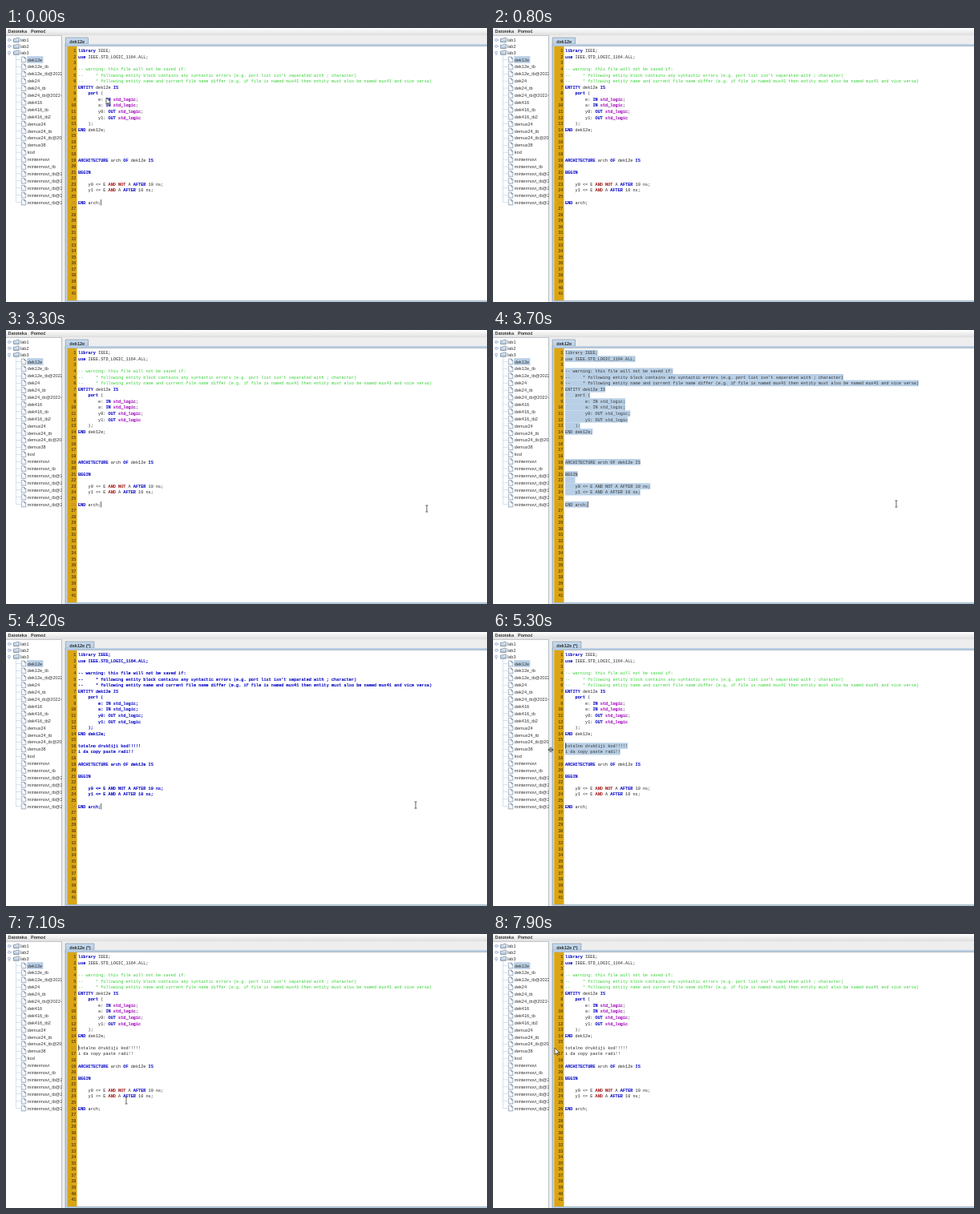
Write an HTML page with a canvas that moves like this. It is 600 px wide and 342 px high and loops after 8 s.

```html
<!DOCTYPE html>
<html lang="hr">
<head>
<meta charset="utf-8">
<title>VHDL editor</title>
<style>
html, body { margin: 0; width: 100%; height: 100%; overflow: hidden; background: #fff; }
canvas { display: block; width: 600px; height: 342px; }
</style>
</head>
<body>
<canvas id="stage" width="600" height="342"></canvas>
<script>
const ctx = document.getElementById('stage').getContext('2d');
const LOOP = 8000, CHAR = 3.128, ROW = 7.57, LEFT = 90, TOP = 28.5;
const MONO = '"Liberation Mono", monospace';
const SANS = '"Liberation Sans", sans-serif';
const SELECT = '#b8cfe5', EDGE = '#7a8a99', BLUE = '#0000c4', HEAVY = 0.22;

const code = `library IEEE;
use IEEE.STD_LOGIC_1164.ALL;

-- warning: this file will not be saved if:
--     * following entity block contains any syntactic errors (e.g. port list isn't separated with ; character)
--     * following entity name and current file name differ (e.g. if file is named mux41 then entity must also be named mux41 and vice versa)
ENTITY dek12e IS
    port (
        e: IN std_logic;
        a: IN std_logic;
        y0: OUT std_logic;
        y1: OUT std_logic
    );
END dek12e;




ARCHITECTURE arch OF dek12e IS

BEGIN
    
    y0 <= E AND NOT A AFTER 10 ns;
    y1 <= E AND A AFTER 10 ns;

END arch;`.split('\n');
const edited = code.slice();
edited[15] = 'totalno drukčiji kod!!!!!';
edited[16] = 'i da copy paste radi!!';

const files = ['dek12e', 'dek12e_tb', 'dek12e_tb@2022-04', 'dek24', 'dek24_tb', 'dek24_tb@2022-04',
  'dek416', 'dek416_tb', 'dek416_tb2', 'demux24', 'demux24_tb', 'demux24_tb@2022', 'demux38', 'kod',
  'mintermovi', 'mintermovi_tb', ...Array(5).fill('mintermovi_tb@2022')];

// Pointer keys: time, x, y
const enterPath = [[3000, 558, 232], [3500, 503, 217], [3700, 503, 217], [4200, 511, 216], [4600, 511, 216],
  [4800, 340, 230], [5000, 160, 149], [5200, 72, 147], [5400, 72, 147], [5600, 66, 158], [5850, 150, 227],
  [6100, 159, 149], [6400, 108, 149], [6600, 84, 141], [6750, 84, 144], [7000, 150, 235], [7250, 150, 168],
  [7500, 100, 148], [7700, 26, 152], [7900, 79, 147], [8000, 79, 147]];
const leavePath = [[0, 127, 92], [100, 127, 92], [700, 112, 350]];

function along(path, t) {
  if (t < path[0][0]) return null;
  for (let i = 1; i < path.length; i++) {
    const [t0, x0, y0] = path[i - 1], [t1, x1, y1] = path[i];
    if (t <= t1) {
      const k = (t - t0) / (t1 - t0);
      return [x0 + (x1 - x0) * k, y0 + (y1 - y0) * k];
    }
  }
  return null;
}

function box(x, y, w, h, fill) {
  ctx.fillStyle = fill;
  ctx.fillRect(x, y, w, h);
}

function poly(points, fill, stroke, open) {
  ctx.beginPath();
  points.forEach(([x, y]) => ctx.lineTo(x, y));
  if (!open) ctx.closePath();
  if (fill) { ctx.fillStyle = fill; ctx.fill(); }
  if (stroke) { ctx.strokeStyle = stroke; ctx.stroke(); }
}

// Sizes are drawn ten times larger and scaled down for even spacing
function text(s, x, y, font, color, weight = 0, align = 'left') {
  ctx.save();
  ctx.translate(x, y);
  ctx.scale(0.1, 0.1);
  ctx.font = font;
  ctx.textAlign = align;
  ctx.fillStyle = ctx.strokeStyle = color;
  ctx.fillText(s, 0, 0);
  if (weight) {
    ctx.lineWidth = weight * 10;
    ctx.lineJoin = 'round';
    ctx.strokeText(s, 0, 0);
  }
  ctx.restore();
}

const mono = (s, x, y, color, weight, align) => text(s, x, y, `${CHAR / 0.06}px ${MONO}`, color, weight, align);
const label = (s, x, y, bold) => text(s, x, y, `${bold ? 'bold ' : ''}55.7px ${SANS}`, '#333');
const rowY = row => TOP + (row - 1) * ROW;
const fileY = i => 39.5 + i * 8.9;

function shade(y0, y1, from, to) {
  const g = ctx.createLinearGradient(0, y0, 0, y1);
  g.addColorStop(0, from);
  g.addColorStop(1, to);
  return g;
}

function folder(y, open) {
  ctx.lineWidth = 0.6;
  ctx.beginPath();
  ctx.arc(4, y, 1.5, 0, 7);
  ctx.fillStyle = '#fff';
  ctx.fill();
  ctx.strokeStyle = '#6382bf';
  ctx.stroke();
  poly(open ? [[4, y + 1.5], [4, y + 3.6]] : [[5.5, y], [7.6, y]], null, '#6382bf', true);
  poly([[9.5, y - 1.6], [12.5, y - 1.6], [13.2, y - 2.6], [16.3, y - 2.6], [16.3, y + 2.6], [9.5, y + 2.6]],
    shade(y - 2, y + 3, '#e4eef8', '#a9c1da'), '#55677c');
}

function fileIcon(y) {
  ctx.lineWidth = 0.6;
  poly([[19.3, y - 3.4], [22.8, y - 3.4], [24.8, y - 1.4], [24.8, y + 3.4], [19.3, y + 3.4]],
    shade(y - 3, y + 4, '#fff', '#e6eef8'), '#6f8299');
  poly([[22.8, y - 3.4], [22.8, y - 1.4], [24.8, y - 1.4]], '#b8cfe5', '#6f8299');
}

function tree() {
  ctx.save();
  ctx.beginPath();
  ctx.rect(0, 10, 69.5, 332);
  ctx.clip();
  box(12.4, 34, 0.6, fileY(files.length - 1) - 34, SELECT);
  ['lab1', 'lab2', 'lab3'].forEach((name, i) => {
    const y = 15 + i * 7.8;
    folder(y, i === 2);
    label(name, 18, y + 2);
  });
  box(26.2, 35.2, 20.2, 8.6, SELECT);
  files.forEach((name, i) => {
    const y = fileY(i);
    box(12.4, y - 0.3, 6, 0.6, SELECT);
    fileIcon(y);
    label(name, 26.8, y + 2);
  });
  ctx.restore();
}

function shell(dirty, current) {
  box(0, 0, 600, 342, '#fff');
  box(0, 0, 600, 9.6, shade(0, 9.6, '#fff', '#dcdcdc'));
  label('Datoteka', 2.5, 6, true);
  label('Pomoć', 31, 6, true);
  box(69.5, 9.6, 530.5, 10.6, '#eee');
  box(69.5, 9.6, 5, 332.4, '#eee');
  box(0, 9.4, 70, 0.6, '#aab4c0');
  box(69.3, 10, 0.7, 332, '#9aa7b5');
  tree();
  const w = dirty ? 35.6 : 28.2;
  ctx.lineWidth = 0.6;
  poly([[74.3, 20.2], [74.3, 12], [74.3 + w, 12], [74.3 + w, 20.2]], shade(11, 21, '#c8dcf0', SELECT), EDGE);
  label(dirty ? 'dek12e (*)' : 'dek12e', 79.3, 18.5, true);

  // Editor border, then the line number gutter
  box(73.8, 20, 526.2, 2, SELECT);
  box(73.8, 22, 526.2, 0.6, EDGE);
  box(73.8, 20, 2, 322, SELECT);
  box(73.8, 20, 0.6, 322, EDGE);
  box(76.2, 23, 12.3, 317, '#dba514');
  box(75.8, 340, 524.2, 0.7, EDGE);
  box(73.8, 340.7, 526.2, 1.3, SELECT);
  for (let n = 1; n <= 41; n++) {
    mono(n, 87.4, rowY(n) + 1.8, n === current ? '#c08a28' : '#2a2010', 0, 'right');
  }
}

const tokens = /(\b(?:library|use|ENTITY|IS|port|IN|OUT|END|ARCHITECTURE|OF|BEGIN|AFTER)\b)|(\b(?:AND|NOT)\b)|(\bstd_logic\b)/g;

function codeLine(s, y, plain) {
  const put = (part, at, color, weight) => mono(part, LEFT + at * CHAR, y, color, weight);
  if (plain) return put(s, 0, plain, HEAVY);
  if (s.startsWith('--')) return put(s, 0, '#32d032');
  let at = 0;
  for (const m of s.matchAll(tokens)) {
    put(s.slice(at, m.index), at, '#222');
    put(m[0], m.index, m[1] ? BLUE : m[2] ? '#a01818' : '#a000b8', HEAVY);
    at = m.index + m[0].length;
  }
  put(s.slice(at), at, '#222');
}

// Drag goes left from the end of row 17, then up to row 16
function dragSelection(t, start, up) {
  if (t >= up) return { 16: 0, 17: 0 };
  const [x] = along(enterPath, Math.max(start, t - 60));
  return { 17: Math.max(0, Math.min(22, Math.round((x - LEFT) / CHAR))) };
}

function selection(t) {
  if (t >= 3400 && t < 4000) return Object.fromEntries(code.map((s, i) => [i + 1, 0]));
  if (t >= 5000 && t < 5800) return dragSelection(t, 5000, 5190);
  if (t >= 6100 && t < 6950) return dragSelection(t, 6100, 6560);
  return {};
}

// The caret blinks anew after each of these moments
const resets = [0, 3400, 4000, 5000, 5190, 5800, 6100, 6950];

function caretAt(t, sel) {
  const since = resets.filter(r => r <= t).pop();
  const on = (t - since) % 1000 < 500;
  if (t < 5000) return { row: 26, col: 9, on };
  if (sel[16] === 0 || t >= 6950) return { row: 16, col: 0, on };
  return { row: 17, col: sel[17] ?? 22, on };
}

function pointer(t) {
  const early = t <= 700, p = along(early ? leavePath : enterPath, t);
  if (!p) return;
  const [x, y] = p;
  ctx.save();
  ctx.translate(x, y);
  ctx.lineWidth = 0.7;
  if (early || x < 69 || (x > 75 && x < 89)) {
    poly([[-2, -5], [-2, 3.4], [-0.1, 1.7], [1.2, 4.6], [2.4, 4], [1.1, 1.3], [3.6, 1]], '#fff', '#222');
  } else if (x <= 75) {
    poly([[-0.8, -3.2], [-0.8, 3.2]], null, '#222', true);
    poly([[0.8, -3.2], [0.8, 3.2]], null, '#222', true);
    poly([[-3.6, 0], [-1.6, -1.6], [-1.6, 1.6]], '#222');
    poly([[3.6, 0], [1.6, -1.6], [1.6, 1.6]], '#222');
  } else {
    poly([[0, -3.8], [0, 3.8]], null, '#222', true);
    poly([[-1.5, -4], [1.5, -4]], null, '#222', true);
    poly([[-1.5, 4], [1.5, 4]], null, '#222', true);
  }
  ctx.restore();
}

function draw(t) {
  const dirty = t >= 4000, lines = dirty ? edited : code;
  const uncolored = t >= 4000 && t < 4400;
  const sel = selection(t), caret = caretAt(t, sel);
  shell(dirty, caret.row);
  lines.forEach((s, i) => {
    const y = rowY(i + 1), from = sel[i + 1];
    if (from === undefined) return codeLine(s, y + 1.8, uncolored && BLUE);
    const x = LEFT + from * CHAR;
    if (from > 0) codeLine(s.slice(0, from), y + 1.8);
    box(x, y - ROW / 2, (s.length - from) * CHAR, ROW, SELECT);
    mono(s.slice(from), x, y + 1.8, '#333');
  });
  if (caret.on) box(LEFT + caret.col * CHAR, rowY(caret.row) - 3.7, 0.7, 7.4, '#222');
  pointer(t);
}

const began = performance.now();
function tick() {
  draw((performance.now() - began) % LOOP);
  requestAnimationFrame(tick);
}
tick();
</script>
</body>
</html>
```
